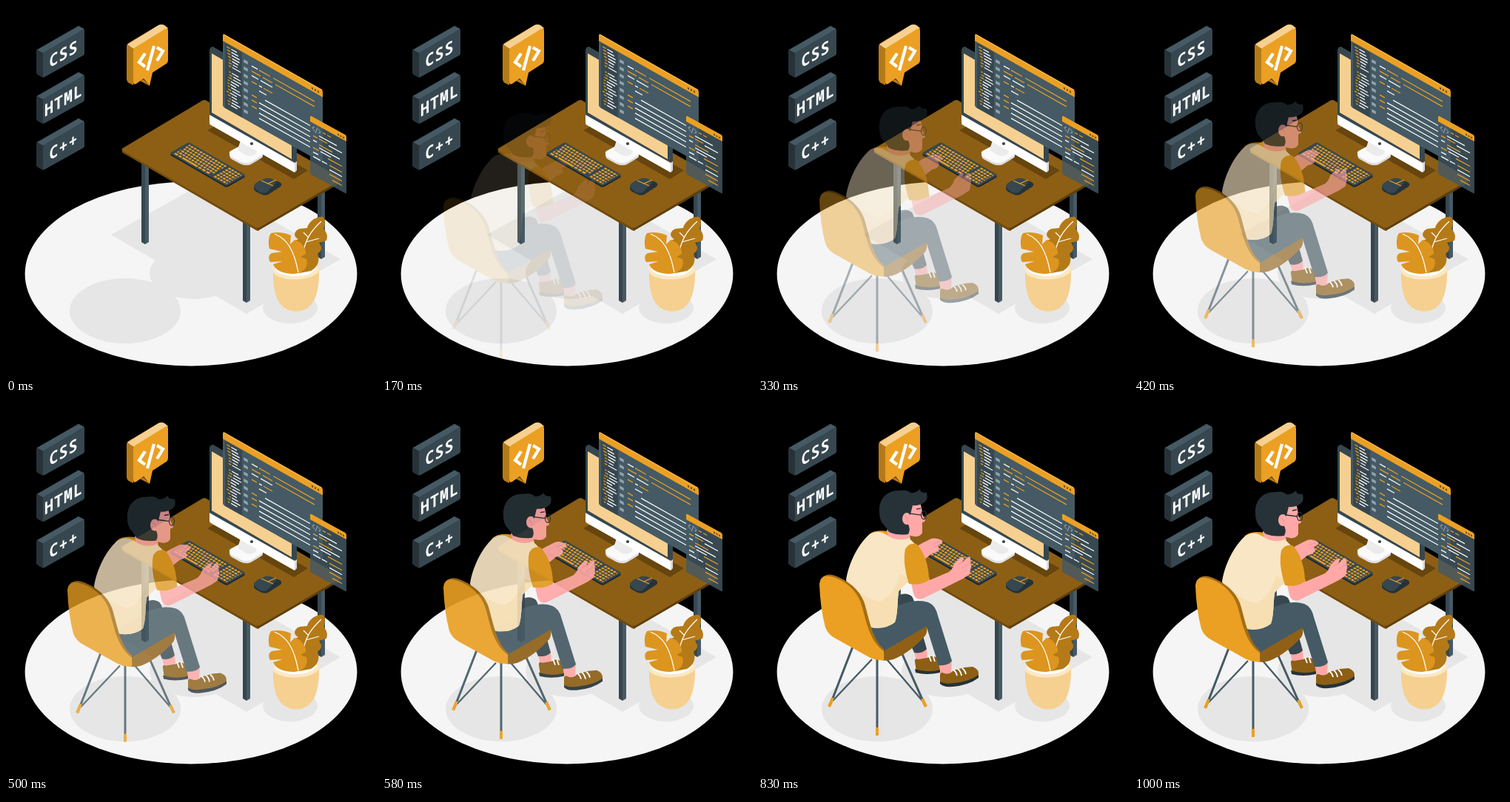
Write an HTML page that moves like this. It is 500 px wide and 500 px high and loops after 1040 ms.

```html
<!DOCTYPE html>
<html>
<head>
<meta charset="utf-8">
<style>
html, body { margin: 0; width: 100%; height: 100%; overflow: hidden; background: #000 }
svg { display: block; width: 100%; height: 100% }
.w { stroke: #fff }
.o { stroke: #eba023 }
.line { fill: none; stroke-width: 1.4 }
.sign { font: 700 23px "Noto Sans Mono", monospace; letter-spacing: 1.2px; fill: #fff; text-anchor: middle }
</style>
</head>
<body>
<svg viewBox="0 0 500 500">
<!-- floor and shadows -->
<ellipse cx="250" cy="362" rx="224.4" ry="124.4" fill="#f5f5f5"/>
<g fill="#e6e6e6">
  <path d="M142 309L325 416 452 342 269 238z"/>
  <ellipse cx="161" cy="412" rx="75" ry="44"/>
  <ellipse cx="254" cy="361" rx="60" ry="35"/>
  <ellipse cx="384" cy="408" rx="37" ry="21"/>
</g>

<g id="signs"></g>

<!-- speech badge -->
<path d="M163 55Q163 51 167 49L206 26Q210 24 214 26L219 30 173 57 172 107 166 104Q163 102 163 98z" fill="#b57a18"/>
<path d="M164 52L206 26Q210 24 214 26L219 30 173 58z" fill="#f6d090"/>
<path d="M181 101L186 99 194 108z" fill="#b57a18"/>
<path d="M172 61Q172 57 176 55L215 31Q219 29 219 33V73Q219 77 215 79L198 90 194 108 186 98 176 105Q172 107 172 103z" fill="#eba023"/>
<path d="M188 64L180 76 188 82M200 54L191 87M204 56L212 61 204 74" fill="none" stroke="#fff" stroke-width="4.2"/>

<!-- desk -->
<g id="legs"></g>
<path d="M157 193V198L338 303Q340 304 342 303V296z" fill="#704a0d"/>
<path d="M340 298V304L452 239V234z" fill="#5d3f0c"/>
<path d="M158 192L265 128Q268 126 271 128L451 232Q454 234 451 236L343 299Q340 300 337 299L158 196Q155 194 158 192z" fill="#8c5f15"/>
<path d="M272 168L290 158 408 222 389 234z" fill="#67450e"/>

<!-- monitor -->
<path d="M302 202Q301 199 305 197L320 189 344 198Q349 201 346 205L331 214Q324 217 316 213L305 207Q302 205 302 202z" fill="#dedede"/>
<path d="M302 199Q301 197 305 195L320 187 344 196Q349 199 346 202L331 211Q324 214 316 210L305 204Q302 202 302 199z" fill="#fafafa"/>
<path d="M317 181L340 194 338 199Q333 204 325 202L315 196Q312 193 315 188z" fill="#ebebeb"/>
<path d="M275 59Q276 55 280 55L393 121V213L275 149z" fill="#37474f"/>
<path d="M278 64L386 127V207L278 144z" fill="#f6d090"/>
<path d="M275 147L390 212V225L277 161Q275 160 275 158z" fill="#fff"/>
<path d="M390 212L393 210V222L390 225z" fill="#dcdcdc"/>
<circle cx="332" cy="186" r="2.1" fill="#37474f"/>

<!-- large code window -->
<g transform="matrix(1 .565 0 1 293 38)">
  <path d="M0 8H135V98H2Q0 98 0 96z" fill="#455a64"/>
  <path d="M3 10H26V98H3z" fill="#37474f"/>
  <path d="M0 2Q0-1 3-1H133Q135-1 135 2V9H0z" fill="#eba023"/>
  <path d="M1 0H133" stroke="#f5c060"/>
  <path d="M120 5h2m2 0h2m2 0h2" stroke="#67450e" stroke-width="2.5"/>
  <g id="side" class="line"></g>
  <path d="M31 18V91" stroke="#90a4ae" stroke-width="5.5" stroke-dasharray="4 5.6"/>
  <g class="line">
    <path class="o" d="M49 21h15m4 0h56M39 28h12m3 0h13m4 0h53M39 42h7M39 60h7M39 67h7M39 75h7M55 42h12"/>
    <path class="w" d="M39 21h8M39 34h9m3 0h16M49 42h4M49 49h10M57 57h61M49 65h69M49 72h69M49 79h69M49 86h69"/>
  </g>
</g>

<!-- small code window, slightly see-through -->
<g transform="matrix(1 .55 0 1 411 149)">
  <path d="M0 5H49V76Q49 78 47 78H2Q0 78 0 76z" fill="#455a64" opacity=".82"/>
  <path d="M47 7H49V77H47z" fill="#37474f"/>
  <path d="M0 1Q0-1 2-1H47Q49-1 49 1V7H0z" fill="#eba023"/>
  <path d="M37 4h2m1.5 0h2m1.5 0h2" stroke="#67450e" stroke-width="2"/>
  <path d="M6 11l-3 3 3 3M10 10l-3 9M11 11l3 3-3 3" fill="none" stroke="#90a4ae"/>
  <g class="line">
    <path class="o" d="M17 13h4m2 0h5M4 24h6m2 0h11M12 32h18M4 40h8M24 44h19M26 52h17M26 64h17M30 70h13"/>
    <path class="w" d="M12 20h24M25 26h18M4 30h5M12 36h28M14 40h14M4 46h7M4 52h10m2 0h7M26 58h17"/>
  </g>
</g>

<!-- keyboard -->
<g transform="matrix(.866 .5 .866 -.5 221 199)">
  <rect x="2" y="-2" width="89" height="30" rx="3" fill="#1c262b"/>
  <rect width="89" height="30" rx="3" fill="#37474f"/>
  <g id="keys" stroke="#e39d2a" stroke-width="2.8" fill="none"></g>
</g>

<!-- mouse -->
<path d="M335 247Q334 241 341 238L351 233Q356 232 362 235L370 238Q374 241 371 244L354 255Q349 257 344 254L338 251Q335 249 335 247z" fill="#263238"/>
<path d="M335 245Q335 240 341 237L351 233Q356 232 362 235L366 238 352 252Q347 254 342 251z" fill="#37474f"/>
<path d="M345 236L361 243M354 240L365 235" fill="none" stroke="#eba023" stroke-width="1.3"/>

<!-- plant -->
<path d="M361 357C360 388 367 412 392 412.5C417 412 424 388 423 353z" fill="#f6d090"/>
<ellipse cx="392" cy="356" rx="31" ry="12.5" fill="#fbe8c6"/>
<ellipse cx="392" cy="355" rx="28" ry="10" fill="#fff"/>
<path d="M425 285C432 283 432 294 429 301C434 306 435 312 433 317L423 320C426 324 427 327 425 331L421 335C424 342 423 352 412 358L396 361 385 337C383 325 387 318 395 315C387 311 390 303 397 301L407 300C409 292 416 286 425 285z" fill="#b57a18"/>
<path d="M426 291C413 303 405 314 401 335M405 319L423 314M408 312L402 306" fill="none" stroke="#fff" stroke-width="1.2"/>
<path d="M358 307C366 305 377 306 385 310L384 322 390 316C400 319 406 327 405 335L398 339 406 342C409 352 403 361 389 362C374 362 364 357 361 349L374 345 357 346C354 341 355 336 359 334L373 332 356 328C354 320 355 311 358 307z" fill="#dc951f"/>
<path d="M363 308C380 315 389 329 395 360" fill="none" stroke="#fff" stroke-width="1.3"/>
<path d="M361 355C365 367 405 374 423 352L423 358C414 373 369 373 361 360z" fill="#fbe8c6"/>

<!-- coder on the chair -->
<g id="coder" opacity="0">
  <!-- far arm -->
  <path d="M206 199L222 190 234 184Q241 182 248 186Q251 189 247 191L243 193 245 198Q242 203 235 204L224 213 212 214z" fill="#ffa8a7"/>
  <path d="M236 191L246 187M238 195L247 191" stroke="#e98f8f" stroke-width=".8"/>
  <!-- far leg -->
  <path d="M211 336L228 332 229 348 214 349z" fill="#ffa8a7"/>
  <path d="M212 350Q211 345 217 347L229 345 236 342 246 347V364Q230 368 214 364z" fill="#8c5f15"/>
  <path d="M212 360Q228 366 246 361V365Q228 369 213 365z" fill="#263238"/>
  <path d="M231 342l3 8M236 341l3 9" stroke="#fff" stroke-width="1.8"/>
  <path d="M186 262Q200 255 208 262Q212 268 213 280L228 333Q222 340 211 338L194 298z" fill="#37474f"/>
  <!-- near leg -->
  <path d="M244 351L262 347 261 366 247 368z" fill="#ffa8a7"/>
  <path d="M246 368Q246 363 252 366Q259 368 264 362L279 358 290 357Q299 360 298 369Q283 381 260 382Q250 382 246 378z" fill="#8c5f15"/>
  <path d="M246 377Q253 381 265 379Q286 377 298 368V372Q285 382 263 384Q250 385 246 380z" fill="#263238"/>
  <path d="M264 361Q268 364 269 369M270 360Q274 363 275 369M276 359Q280 362 281 367" fill="none" stroke="#fff" stroke-width="1.8"/>
  <path d="M146 300L188 275Q212 264 230 270Q240 274 243 288L262 349Q258 356 244 355L228 304 170 338 155 330z" fill="#455a64"/>
  <!-- chair legs -->
  <g fill="none" stroke="#455a64" stroke-width="3">
    <path d="M128 330L97 410M161 343V449M195 340L226 410"/>
    <path d="M154 347L101 403M174 347L222 403" stroke-width="2.3"/>
  </g>
  <path d="M101 399L96 411M161 439V450M222 400L227 411" stroke="#eba023" stroke-width="4"/>
  <!-- torso -->
  <path d="M146 184Q152 170 176 174L183 184 160 190z" fill="#eba023"/>
  <path d="M174 172L203 170 206 184Q196 190 176 182z" fill="#ffa8a7"/>
  <path d="M119 240C122 220 134 192 151 178Q162 171 174 179Q188 189 204 183L213 192 207 238 190 255C188 272 189 285 185 297Q172 307 153 304L130 265z" fill="#f9e6c4"/>
  <path d="M119 240Q145 267 165 269Q183 262 192 232L207 238 190 255C188 272 189 285 185 297Q172 307 153 304L130 265z" fill="#f7dfb3"/>
  <!-- near arm -->
  <path d="M206 240L231 236 232 240 258 229Q264 224 265 218L272 211Q276 207 278 210L276 216 283 209Q288 207 287 212L288 222 286 232 277 238 223 265Q213 268 210 258z" fill="#ffa8a7"/>
  <path d="M270 219L279 214M276 224L286 217" stroke="#e98f8f" stroke-width=".8"/>
  <path d="M199 198Q204 189 214 191C224 200 231 220 231 240Q219 248 204 245Q195 217 199 198z" fill="#e09a20"/>
  <!-- head -->
  <path d="M198 140L219 135Q222 145 222 151L226 159Q226 161 222 162V176Q219 182 211 181L196 178z" fill="#ffa8a7"/>
  <path d="M164 148C163 130 174 118 192 119Q201 117 206 122Q213 123 219 117Q218 122 228 122Q230 130 226 134Q219 140 209 139L206 151 202 163Q207 171 203 178Q188 180 177 175Q172 167 168 163Q164 157 164 148z" fill="#263238"/>
  <ellipse cx="201" cy="157" rx="6" ry="8" fill="#ffa8a7"/>
  <path d="M198 154Q202 155 203 160" fill="none" stroke="#e98f8f"/>
  <path d="M206 150L221 152M214 144L220 143" stroke="#263238" stroke-width="1.3"/>
  <ellipse cx="224" cy="152" rx="3.5" ry="5.5" fill="none" stroke="#263238" stroke-width="1.3"/>
  <!-- chair shell -->
  <path d="M168 337L228 302Q229 311 226 315C214 329 198 341 183 347Q174 350 166 348z" fill="#8f6016"/>
  <path d="M87 236Q95 229 109 236C129 245 141 259 145 275C151 297 156 322 170 333L171 348 158 347 88 260z" fill="#a46e15"/>
  <path d="M83 245Q84 232 98 235C122 241 137 259 141 277C147 300 152 323 170 336V348Q160 349 150 344L105 319Q95 314 91 304Q84 277 83 245z" fill="#eba023"/>
</g>
</svg>

<script>
const $ = id => document.getElementById(id);

['CSS', 'HTML', 'C++'].forEach((word, i) => {
  $('signs').innerHTML += `<g transform="translate(0 ${i * 62.5})">
    <path d="M41 61Q41 59 43 58L50 62V97L43 93Q41 92 41 90z" fill="#263238"/>
    <path d="M42 59L96 28Q98 26 100 28L106 31 51 64z" fill="#455a64"/>
    <path d="M50 65Q50 63 52 62L104 32Q106 31 106 33V64Q106 66 104 67L52 96Q50 97 50 95z" fill="#37474f"/>
    <text class="sign" transform="matrix(.866 -.5 0 1 78 72.5)">${word}</text></g>`;
});

[[183, 205, 322], [320, 285, 401], [421, 245, 342]].forEach(([x, top, end]) => {
  $('legs').innerHTML += `<path d="M${x} ${top}h5v${end - top}l-5-3z" fill="#37474f"/>
    <path d="M${x + 5} ${top}h5v${end - top - 3}l-5 3z" fill="#455a64"/>`;
});

let seed = 7;
const rand = () => (seed = seed * 16807 % 2147483647) / 2147483647;

// sidebar listing: a short and a longer dash per row
for (let y = 14; y < 92; y += 4) {
  if (y === 42) continue;
  const x = 5 + rand() * 4, a = 2 + rand() * 3, b = 6 + rand() * 6;
  const [first, second] = y % 8 ? 'ow' : 'wo';
  $('side').innerHTML += `<path class="${first}" d="M${x} ${y}h${a}"/>
    <path class="${second}" d="M${x + a + 1.5} ${y}h${b}"/>`;
}

for (let row = 0; row < 6; row++) {
  const y = 4 + row * 4.4;
  const main = row ? `<path d="M4 ${y}H62" stroke-dasharray="3.4 1.3" stroke-dashoffset="${row * 1.2}"/>`
                   : `<path d="M4 ${y}h5m1.5 0h4m1.5 0h24m1.5 0h4m1.5 0h5m1.5 0h5"/>`;
  $('keys').innerHTML += main + `<path d="M66 ${y}H86" stroke-dasharray="3.4 1.3"/>`;
}

// cubic bezier easing (.36, -.01, .5, 1.38), solved by bisection
const curve = (a, b, s) => 3 * a * s * (1 - s) ** 2 + 3 * b * s * s * (1 - s) + s ** 3;
function ease(x) {
  let lo = 0, hi = 1;
  for (let i = 0; i < 24; i++) {
    const mid = (lo + hi) / 2;
    if (curve(.36, .5, mid) < x) lo = mid; else hi = mid;
  }
  return curve(-.01, 1.38, lo);
}

const coder = $('coder'), start = performance.now();
function draw(now) {
  const t = Math.max(0, now - start) % 1040;
  const p = ease(Math.min(1, (t + 20) / 1000));
  coder.setAttribute('transform', `translate(0 ${30 * (1 - p)})`);
  coder.setAttribute('opacity', Math.min(1, Math.max(0, p)));
  requestAnimationFrame(draw);
}
draw(start);
</script>
</body>
</html>
```
